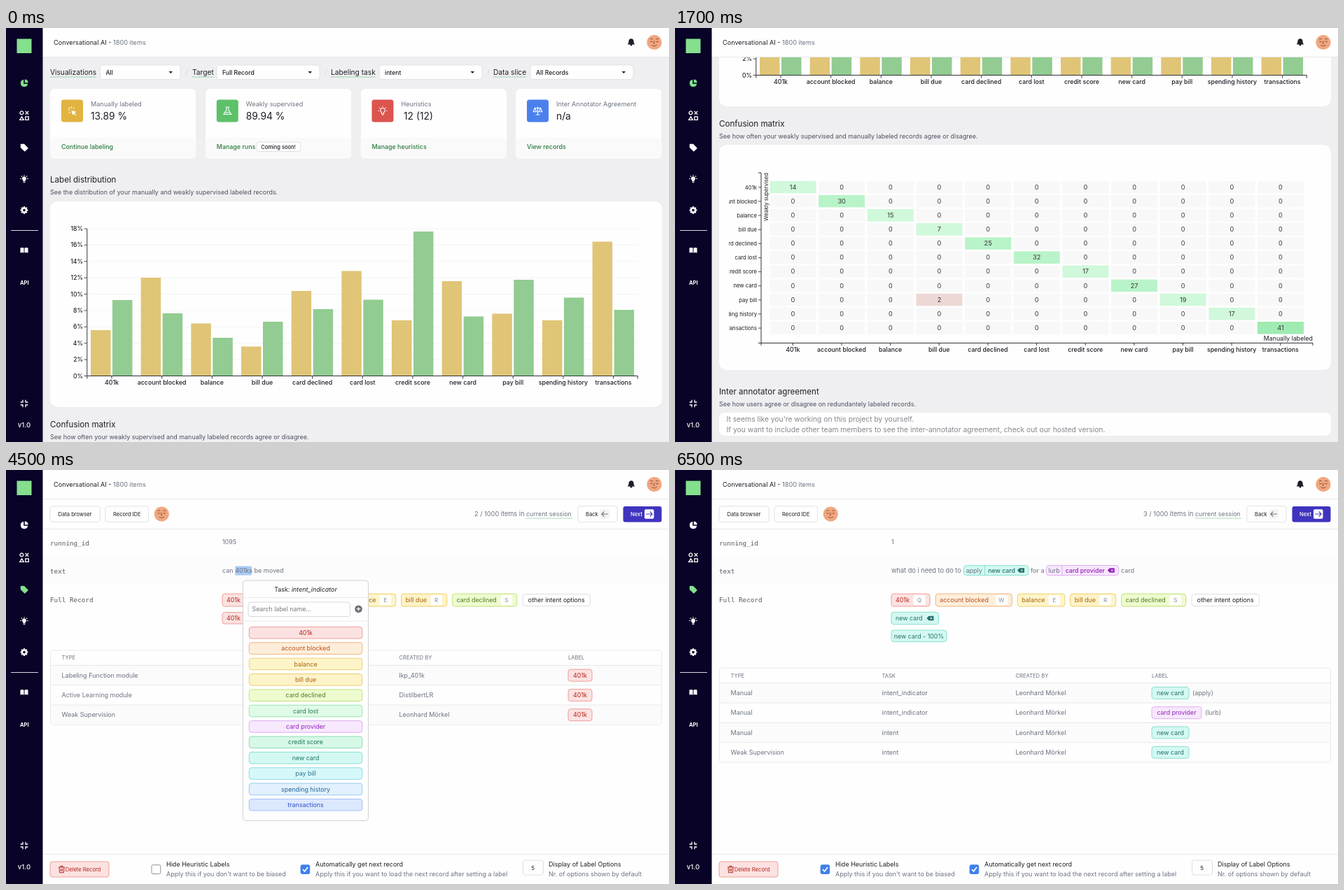
An HTML page that plays this animation: 947 px wide and 592 px high, repeating every 8 s.

```html
<!DOCTYPE html>
<html lang="en">
<head>
<meta charset="utf-8">
<title>Labeling tool tour</title>
<style>
html, body { margin: 0; width: 100%; height: 100%; overflow: hidden; background: #fefefe; }
svg { display: block; width: 100vw; height: 100vh; font-family: Inter, sans-serif; white-space: pre; }
.mono { font-family: "DejaVu Sans Mono", monospace; }
.card { filter: drop-shadow(0 .7px .7px #0002); }
.m { font-weight: 500; }
</style>
</head>
<body>
<svg id="stage" viewBox="0 0 947 592"></svg>
<script>
const INK = '#1d1f26', GRAY = '#6b7280', PALE = '#9b9da3', GREEN = '#2b7a3d', LINE = '#e3e4e7', LIME = '#85e08d';
const LABELS = ['401k', 'account blocked', 'balance', 'bill due', 'card declined', 'card lost',
  'credit score', 'new card', 'pay bill', 'spending history', 'transactions'];
const USER = 'Leonhard Mörkel', BRAND = 'lurb';
// background, border, text
const TINT = {
  red: ['#fbe2e1', '#ec8a86', '#b3241f'], orange: ['#fdeedb', '#f0a45e', '#b9501c'],
  amber: ['#fdf4c9', '#edc652', '#a8620f'], yellow: ['#fdf3c8', '#eac54a', '#a8620f'],
  lime: ['#eefbcf', '#b2dc5c', '#4d7c1f'], green: ['#dffbe7', '#85dda0', '#2c7d47'],
  purple: ['#f7e8fd', '#d79bee', '#9423b8'], emerald: ['#d7f8e6', '#74d3a7', '#20755a'],
  teal: ['#d3f9f2', '#72d8ca', '#26706b'], cyan: ['#d6f8fa', '#74d3e2', '#2a6f8c'],
  sky: ['#e2f1fd', '#7fbfed', '#1f659b'], blue: ['#dce8fd', '#8db3f3', '#2f4fc4']
};
const range = (n, fn) => Array.from({length: n}, (_, i) => fn(i)).join('');

// y is the vertical middle of the lettering
const text = (x, y, s, size = 8.9, fill = INK, attrs = '') =>
  `<text x="${x}" y="${y + size * .36}" font-size="${size}" fill="${fill}" ${attrs}>${s}</text>`;
const mid = (x, y, s, size, fill, attrs = '') => text(x, y, s, size, fill, 'text-anchor="middle" ' + attrs);
const end = (x, y, s, size, fill, attrs = '') => text(x, y, s, size, fill, 'text-anchor="end" ' + attrs);
const mono = (x, y, s, fill = INK) => text(x, y, s, 9.3, fill, 'class="mono"');
const rect = (x, y, w, h, fill, stroke = 'none', r = 0, attrs = '') =>
  `<rect x="${x}" y="${y}" width="${w}" height="${h}" fill="${fill}" stroke="${stroke}" stroke-width=".8" rx="${r}" ${attrs}/>`;
const card = (x, y, w, h, r, stroke) => rect(x, y, w, h, '#fefefe', stroke, r, 'class="card"');
const path = (d, stroke = INK, w = 1, fill = 'none', attrs = '') =>
  `<path d="${d}" stroke="${stroke}" stroke-width="${w}" fill="${fill}" ${attrs}/>`;
const disc = (x, y, r, fill, stroke = 'none', w = 1) =>
  `<circle cx="${x}" cy="${y}" r="${r}" fill="${fill}" stroke="${stroke}" stroke-width="${w}"/>`;
const group = (s, attrs) => `<g ${attrs}>${s}</g>`;
const at = (x, y, s) => group(s, `transform="translate(${x} ${y})"`);
const hline = (x1, x2, y, stroke = LINE, w = .8) => path(`M${x1} ${y}H${x2}`, stroke, w);
const dotted = (x1, x2, y) => path(`M${x1} ${y}H${x2}`, '#4fae68', .8, 'none', 'stroke-dasharray="1 .7"');
const button = (x, y, w, h, stroke = LINE) => card(x, y, w, h, 3, stroke);
const pill = (x, y, w, tint, s, h = 17) => rect(x, y - h / 2, w, h, TINT[tint][0], TINT[tint][1], 3.5) +
  mid(x + w / 2, y, s, 8.9, TINT[tint][2]);
const trash = (x, y, c) => at(x, y, path('M-4.5 -3H4.5M-1.5 -3V-4.7H1.5V-3M-3.5 -3L-3 4.7H3L3.5 -3M-1 -1V3M1 -1V3', c, 1));
const arrow = (x, y, c, dir = 1) => at(x, y, path(`M${-4.5 * dir} 0H${4.5 * dir}M${dir} -3.5L${4.5 * dir} 0L${dir} 3.5`, c, 1.1));
const erase = (x, y, c) => at(x, y, path('M-5 0L-2 -3.2H5V3.2H-2Z', 'none', 0, c) + path('M0 -1.4L2.8 1.4M2.8 -1.4L0 1.4', '#fff', .8));
const avatar = (x, y) => at(x, y, disc(0, 0, 10.6, '#f0a77f') +
  path('M-6 -4.5Q-4 -6 -2 -4.5M2 -4.5Q4 -6 6 -4.5M-6 -1.5Q-4 .2 -2 -1.5M2 -1.5Q4 .2 6 -1.5M0 -2L-.8 1.6H.8M-3.6 4Q0 7 3.6 4', '#8a4a35', .9));

/* Sidebar and header */
const ICONS = [
  at(26, 79, path('M-.8 -5.2A5.2 5.2 0 1 0 5.2 .8H-.8Z', 'none', 0, 'currentColor') +
    path('M.8 -5.6A5 5 0 0 1 5.6 -.8H.8Z', 'none', 0, 'currentColor')),
  at(26, 125, path('M-3.5 1.8L-6.3 6.3H-.7ZM1.8 1.8H6.3V6.3H1.8ZM1.6 -6L6.2 -1.4M6.2 -6L1.6 -1.4', 'currentColor', 1.3) +
    disc(-3.6, -3.7, 2.4, 'none', 'currentColor', 1.3)),
  at(26, 171, path('M-5.2 -4.4Q-5.2 -5.2 -4.4 -5.2H0L5.3 .2Q5.8 .8 5.3 1.4L1.4 5.2Q.8 5.7 .2 5.2L-5.2 0Z', 'none', 0, 'currentColor')),
  at(26, 216, path('M-1.6 3.4V1.8A3 3 0 1 1 1.6 1.8V3.4ZM-1.4 4.2H1.4V5.2H-1.4Z', 'none', 0, 'currentColor') +
    path('M0 -6V-4.4M-5.8 -.5H-4M4 -.5H5.8M-4.2 -4.5L-3 -3.4M4.2 -4.5L3 -3.4', 'currentColor', 1.1)),
  at(26, 260.5, disc(0, 0, 3, 'none', 'currentColor', 2.4) +
    range(8, i => path('M0 -5.4V-3.6', 'currentColor', 2.2, 'none', `transform="rotate(${i * 45})"`))),
  at(26, 318, path('M-5.5 -3.6Q-2.5 -4.6 -.5 -3.4V3.6Q-2.5 2.6 -5.5 3.5ZM5.5 -3.6Q2.5 -4.6 .5 -3.4V3.6Q2.5 2.6 5.5 3.5Z', 'none', 0, 'currentColor')),
  mid(26.3, 364, 'API', 7.6, 'currentColor', 'font-weight="700"'),
  at(26, 537, path('M-5.3 -2H-2V-5.3M5.3 -2H2V-5.3M-5.3 2H-2V5.3M5.3 2H2V5.3', 'currentColor', 1.3)),
  mid(26, 568, 'v1.0', 9.6, 'currentColor', 'class="m"')
];
const frame = rect(52, 0, 895, 41.5, '#fefefe') + hline(52, 947, 41.6, '#e4e4e7') +
  rect(0, 0, 52.5, 592, '#080327') + rect(15.5, 15.5, 21, 20.5, LIME) +
  ICONS.map(s => group(s, 'class="icon"')).join('') + hline(7, 46, 289.5, '#d8d8df', 1.2) +
  text(68, 20.5, `Conversational AI - <tspan fill="${GRAY}">1800 items</tspan>`, 9.15) +
  at(893, 20, path('M-4.7 3.2Q-3.3 1.8 -3.3 -1A3.3 3.6 0 0 1 3.3 -1Q3.3 1.8 4.7 3.2Z', INK, .5, INK) + disc(0, 4, 1.5, INK)) +
  avatar(926, 20.5);

/* Dashboard */
const select = (x, w, s) => rect(x, 53, w, 20.5, '#fefefe', '#dcdde1', 3.5) + text(x + 8, 63.5, s, 8.6, INK, 'class="m"') +
  path(`M${x + w - 16.5} 62H${x + w - 11}L${x + w - 13.7} 65Z`, 'none', 0, INK);
const filterName = (x, w, s) => text(x, 63, s, 10.2) + dotted(x, x + w, 70);
const stat = (x, color, icon, name, value, link) => card(x, 87, 208.5, 100, 6) +
  rect(x, 157, 208.5, 30, '#fafafa', 'none', 6) +
  rect(x + 16, 102.5, 31, 32, color, 'none', 3.5) + at(x + 31.5, 118.5, icon) +
  text(x + 58, 109, name, 9.1, GRAY) + text(x + 58, 126.5, value, 13.8) + text(x + 16, 169.5, link, 8.9, GREEN, 'class="m"');
const heading = (y, title, sub) => text(63, y, title, 11.6) + text(63, y + 18, sub, 8.95, '#4b5060');

const YELLOW = [432, 357, 422.5, 455.5, 376, 347.5, 418, 362, 408.5, 418, 305.5];
const LEAF = [389, 408, 443, 420, 402, 388.5, 291, 412.5, 360, 385.5, 403];
const bar = (x, top, c) => rect(x, top, 28.5, 497.5 - top, c);
const barChart = card(63, 247.5, 874, 294.5, 10) +
  range(10, i => {
    const y = 497.5 - i * 23.39;
    return hline(116, 902, y, '#f1f1f3') + hline(111.5, 115.5, y, INK) + end(110, y, i * 2 + '%', 8.6, INK, 'class="m"');
  }) +
  LABELS.map((s, i) => {
    const x = 121 + i * 71.66;
    return bar(x, YELLOW[i], '#e0c577') + bar(x + 31, LEAF[i], '#92cc92') +
      path(`M${x + 30} 497.5V501.5`, INK, .9) + mid(x + 30, 506.7, s, 8.8, INK, 'class="m"');
  }).join('') + path('M115.8 287V497.5H902.3V501.5M115.8 497.5V501.5', INK, .9);

const DIAGONAL = [14, 30, 15, 7, 25, 32, 17, 27, 19, 17, 41];
const shade = v => ['#d0f8da', '#b9f3c8', '#9febb2'][Math.floor(v / 20)];
const cell = (row, col) => {
  const odd = row === 8 && col === 3, v = odd ? 2 : row === col ? DIAGONAL[row] : 0;
  const x = 135.5 + col * 69.65, y = 648.7 + row * 20.13;
  return rect(x, y, 66, 17.6, odd ? '#edd8d6' : v ? shade(v) : '#f8f8f9') + mid(x + 33, y + 8.6, v, 9.2, '#34363c');
};
const matrix = card(63, 597, 874, 322, 10) + '<clipPath id="inner"><rect x="77" y="630" width="850" height="280"/></clipPath>' +
  group(LABELS.map((s, i) => {
    const y = 657.5 + i * 20.13, x = 168.3 + i * 69.65;
    return end(117, y + .3, s, 7.7) + hline(119, 123, y + .3, INK) + range(11, c => cell(i, c)) +
      path(`M${x} 880.5V884`, INK, .9) + mid(x, 889.5, s, 8.8, INK, 'class="m"');
  }).join(''), 'clip-path="url(#inner)"') +
  path('M119 637H123V884M119 880.5H911V884', INK, .9) +
  text(0, 0, 'Weakly supervised', 7.7, INK, 'text-anchor="end" transform="translate(130 637) rotate(-90)"') +
  end(911, 873.5, 'Manually labeled', 8.8);

const dashboard = rect(52, 0, 895, 1100, '#efeff1') +
  filterName(63, 66, 'Visualizations') + select(134.5, 114.5, 'All') +
  filterName(266, 30, 'Target') + select(301, 147, 'Full Record') +
  filterName(464, 63.5, 'Labeling task') + select(533, 147, 'intent') +
  filterName(696, 47.5, 'Data slice') + select(749, 147, 'All Records') +
  [258, 457, 689].map(x => mid(x, 63, '/', 10, '#d5d6da')).join('') +
  stat(63, '#e1b341', path('M-1 -1L6 1.5L3.2 3L6 6L4.8 6.8L2 4L.5 6.3Z', 'none', 0, '#fff') +
    path('M-6 -1.5H-3.5M-1 -6V-4M-5 -5L-3 -3.3M3 -5L1.5 -3.3M-4.5 3L-3 1.4', '#fff', 1.1), 'Manually labeled', '13.89 %', 'Continue labeling') +
  stat(284.8, '#5cc169', path('M-2.5 -5.5H2.5M-1.5 -5.5V-1L-5.5 5H5.5L1.5 -1V-5.5M-3.8 2.5H3.8', '#fff', 1.1), 'Weakly supervised', '89.94 %', 'Manage runs') +
  stat(506.5, '#dc544e', path('M-1.5 4V2.2A3.3 3.3 0 1 1 1.5 2.2V4ZM-1.5 5.7H1.5M0 -6.8V-5.4M-6.5 0H-5M5 0H6.5M-4.8 -4.8L-3.8 -3.8M4.8 -4.8L3.8 -3.8', '#fff', 1.1), 'Heuristics', '<tspan dx="3.5">12 (12)</tspan>', 'Manage heuristics') +
  stat(728, '#4b80ec', path('M0 -6V5.5M-3 5.5H3M-5 -4H5M-4 -4L-6.3 1.2H-1.7ZM4 -4L1.7 1.2H6.3Z', '#fff', 1.1), 'Inter Annotator Agreement', 'n/a', 'View records') +
  rect(358, 163, 63, 13.5, '#fefefe', '#d9dade', 3.5) + mid(389, 169.8, 'Coming soon!', 7.5, INK, 'class="m"') +
  heading(217, 'Label distribution', 'See the distribution of your manually and weakly supervised labeled records.') + barChart +
  heading(567, 'Confusion matrix', 'See how often your weakly supervised and manually labeled records agree or disagree.') + matrix +
  heading(949.8, 'Inter annotator agreement', 'See how users agree or disagree on redundantely labeled records.') +
  card(63, 979.5, 874, 33.5, 8) + text(73.5, 988.8, "It seems like you're working on this project by yourself.", 10.3, '#85878d') +
  text(73.5, 1004.5, 'If you want to include other team members to see the inter-annotator agreement, check out our hosted version.', 10.3, '#85878d');

/* Data browser */
const section = (y, title, sub, extra = '') => path(`M65.5 ${y + 3.5}L69.5 ${y + 7.5}L73.5 ${y + 3.5}`, INK, 1.1) +
  text(81.5, y, title, 9.8) + text(154, y, extra, 9.8) + text(81.5, y + 13, sub, 7.6, PALE);
const record = (y, h, id, s, foot) => card(321.3, y, 615.3, h, 4, LINE) + mono(337, y + 22.7, 'running_id') + text(337, y + 35.6, id) +
  mono(337, y + 59.7, 'text') + text(337, y + 72.6, s) +
  text(337, foot, 'Find similar records', 8.9, GREEN, 'class="m"') + at(431, foot, path('M-6 5L0 -5L6 5ZM1.5 -5L6 3', GREEN, 1)) +
  end(902, foot, 'Continue with this record', 8.9, GREEN, 'class="m"') + arrow(912, foot + .5, GREEN);
const COLS = [424, 548, 623.5, 708, 837], WIDE = [406.5, 539, 657, 750, 853.5];
const results = (y, h, cols, rows, tint, w) => rect(337.5, y, 582, h, '#fefefe', LINE, 3) +
  ['TYPE', 'TASK', 'LABEL', 'AMOUNT', 'AVG. CONFIDENCE'].map((s, i) => mid(cols[i], y + 10.8, s, 7.6, GRAY)).join('') +
  rows.map((r, i) => {
    const ry = y + 21.5 + i * 24.4;
    return hline(337.5, 919.5, ry) + r.map((s, c) => c === 2 ? pill(cols[c] - w / 2, ry + 12.4, w, tint, s) :
      mid(cols[c], ry + 12.4, s, 8.7, GRAY)).join('');
  }).join('');
const browser = rect(52, 41, 263.5, 551, '#fefefe') + rect(315.5, 41, 632, 551, '#f4f4f5') +
  text(63, 62, 'Existing filters', 11.2) + rect(149.3, 56.7, 10.6, 10.6, 'none', INK, 1.5) + path('M153 57V67', INK, 1.2) +
  ['You can filter and order all your data in the browser', 'according to your needs. Selected filter criteria can be', 'saved and used later on.']
    .map((s, i) => text(63, 77.5 + i * 13.2, s, 8.9, PALE)).join('') +
  button(63, 116, 111.5, 22) + disc(77, 127, 5.8, '#e4edfd', '#3564cf', 1.2) + path('M77 126.3V130M77 123.7V124.9', '#3564cf', 1.3) +
  text(88.5, 127, 'random_ord...', 8.9, '#42454d') + trash(161, 127, '#c2352d') +
  text(63, 160.5, 'Filter creation', 11.4) + hline(147, 305, 160.5) +
  section(188.3, 'Attributes', 'Filter on attributes of your records') +
  section(225.1, 'Users', 'Filter manual labels by creation user') +
  section(262, 'Labeling Task:', 'Choose from anything related to intent_indicator', 'intent_indicator') +
  section(298.8, 'Labeling Task:', 'Choose from anything related to intent', 'intent') +
  section(335.7, 'Result Order', 'Order your results by') +
  text(63, 373.8, 'Connect by', 10.3) + dotted(63, 119, 380.5) +
  disc(130, 373.7, 4.8, '#fff', '#3477ea', 1.1) + disc(130, 373.7, 2.7, '#3477ea') + text(138, 373.7, 'OR', 8) +
  disc(159.8, 373.7, 4.8, '#fff', '#777', .8) + text(168, 373.7, 'AND', 7.8) +
  button(63, 394, 84, 24) + text(91, 406, 'Save filter', 7.5) + at(78, 406, path('M-5 -4.6H5L1.3 .2V4.5L-1.3 3V.2Z', INK, 1.1)) +
  button(152, 394, 82, 24, '#eeeef0') + text(178, 406, 'Update filter', 7.5, PALE) +
  at(164.5, 406, path('M1 5A5 5 0 0 0 4 -3.5M-1.5 -5A5 5 0 0 0 -4 3.5M-4 3.5H-1M-4 3.5V.8M0 -5.3H3.8V-2', PALE, 1)) +
  button(63, 421.5, 84, 24) + text(91, 433.5, 'Find outliers', 7.5) +
  disc(74.6, 436, 2.8, 'none', '#76802b', 1.3) + disc(80.5, 430, 2.5, 'none', '#76802b', 1.3) + disc(81, 437.5, 1.7, 'none', '#76802b', 1.1) + disc(74.5, 429.5, 1.2, '#76802b') +
  text(321, 65, '1,800 Items', 8.8) +
  button(717, 53, 84.5, 24) + text(744.5, 65, 'Configuration', 7.6) +
  at(732, 65, path('M-4 -5.5V5.5M0 -5.5V5.5M4 -5.5V5.5', INK, 1.1) + disc(-4, 1.5, 1.4, '#fff', INK, 1) + disc(0, -2, 1.4, '#fff', INK, 1) + disc(4, 2.5, 1.4, '#fff', INK, 1)) +
  button(804.5, 53, 126.5, 24) + text(829.5, 65, 'Download filtered records', 7.6) +
  at(819, 65, path('M-5.3 2V5.2H5.3V2M0 -5.5V2M-3 -1L0 2L3 -1', INK, 1.1)) +
  record(99, 117.8, '668', 'what is my fica score', 197.5) +
  record(228, 221, '1095', 'can 401ks be moved', 429.6) +
  results(318, 94.7, COLS, [['AL: DistilbertLR', 'intent', '401k', '1', ''], ['LF: lkp_401k', 'intent', '401k', '1', ''],
    ['Weak Supervision', 'intent', '401k', '1', '99.99%']], 'red', 33.5) +
  record(460.3, 200, '1', `what do i need to do to apply for a ${BRAND} card`, 640) +
  results(550.3, 90, WIDE, [['AL: DistilbertLR', 'intent', 'new card', '1', '']], 'teal', 53.5) +
  rect(315.5, 584.5, 632, 8, '#f4f4f5');

/* Labeling view */
const choice = (x, w, tint, s, key) => rect(x, 177, w, 18, TINT[tint][0], TINT[tint][1], 3.5) + text(x + 6, 186, s, 8.9, TINT[tint][2]) +
  rect(x + w - 23.5, 179, 17, 14, '#fefefe', 'none', 2.5) + mid(x + w - 15, 186, key, 8, '#85878d');
const option = (x, y, title, sub) => text(x, y, title, 9) + text(x, y + 13.2, sub, 9, GRAY);
const check = (x, on) => rect(x, 564.7, 12.8, 12.8, on ? '#3f7fec' : '#fff', on ? '#3f7fec' : '#777', 2) +
  (on ? path(`M${x + 3} 571.2L${x + 5.6} 574L${x + 10} 568`, '#fff', 1.7) : '');
const labeling = (pos, id, body, hide) => rect(52, 41, 895, 551, '#fefefe') + hline(52, 947, 84.5) +
  button(63, 52, 71, 22) + mid(98.5, 63, 'Data browser', 7.6) + button(142, 52, 61.5, 22) + mid(172.8, 63, 'Record IDE', 7.6) + avatar(222.3, 63) +
  text(669, 63, pos + ' / 1000 items in', 9.2, GRAY) + text(743, 63, 'current session', 8.9, GRAY) + dotted(743, 809, 69) +
  button(817, 51.5, 56, 23) + text(828, 63, 'Back', 7.6) + rect(848.5, 56.3, 13.5, 13.5, '#f3f3f5', 'none', 2) + arrow(855.3, 63, '#777', -1) +
  rect(881.5, 52, 55, 22.5, '#3f34bd', 'none', 3) + text(892, 63, 'Next', 7.6, '#fff', 'class="m"') +
  rect(912, 56.3, 13.5, 13.5, '#fff', 'none', 2) + arrow(918.7, 63, '#4b41bd') +
  rect(52, 125, 895, 39, '#fcfcfc') +
  mono(63, 105, 'running_id', '#555862') + mono(63, 145, 'text', '#555862') + mono(63, 185.5, 'Full Record', '#555862') +
  text(309, 103, id, 8.9, GRAY) +
  choice(309, 55, 'red', '401k', 'Q') + choice(372.3, 109, 'orange', 'account blocked', 'W') + choice(489.3, 67.5, 'amber', 'balance', 'E') +
  choice(564.7, 65, 'yellow', 'bill due', 'R') + choice(637.7, 92, 'lime', 'card declined', 'S') +
  rect(738, 177.5, 96.5, 17, '#fefefe', '#d6d7db', 3.5) + mid(786.3, 186, 'other intent options', 8.8) + body +
  rect(52, 549.5, 895, 43, '#fefefe') + hline(52, 947, 549.5) +
  rect(63, 560, 84, 22, TINT.red[0], TINT.red[1], 3) + trash(79.5, 571, TINT.red[2]) + text(84.7, 571, 'Delete Record', 7.6, TINT.red[2]) +
  check(208, hide) + option(229, 564.2, 'Hide Heuristic Labels', "Apply this if you don't want to be biased") +
  check(421, true) + option(442, 564.2, 'Automatically get next record', 'Apply this if you want to load the next record after setting a label') +
  rect(738.5, 558, 29, 21, '#fefefe', '#d6d7db', 3) + mid(752.5, 568.7, '5', 8) +
  option(775, 564.2, 'Display of Label Options', 'Nr. of options shown by default');
// Each row: texts per column, tint, pill width, optional note
const history = (y, cols, rows) => rect(63.5, y, 873, 21.7 + rows.length * 28.3, '#fefefe', LINE, 3) +
  ['TYPE', 'TASK', 'CREATED BY', 'LABEL'].map((s, i) => text(cols[i], y + 10.8, s, 7.6, GRAY)).join('') +
  rows.map(([cells, tint, w, note = ''], r) => {
    const top = y + 21.7 + r * 28.3, cy = top + 14.2;
    return (r % 2 ? '' : rect(64, top, 872, 28, '#fbfbfb')) + hline(63.5, 936.5, top) +
      cells.map((s, i) => i < 3 ? text(cols[i], cy, s, 9, GRAY) : pill(cols[i], cy, w, tint, s)).join('') +
      text(cols[3] + w + 5, cy, note, 9, GRAY);
  }).join('');

const MENU = [...LABELS];
MENU.splice(6, 0, 'card provider');
const popup = rect(338.5, 158, 179, 343.5, '#fefefe', '#cbccd1', 4, 'class="card"') +
  mid(428, 170.5, 'Task: <tspan font-style="italic">intent_indicator</tspan>', 8.9) + hline(338.5, 517.5, 182.5) +
  rect(346, 189, 145.5, 20.5, '#fefefe', '#d0d1d6', 3) + text(351.5, 199, 'Search label name...', 8.8, '#777a82') +
  disc(503.5, 198.7, 5.3, '#6b6e76') + path('M500.8 198.7H506.2M503.5 196V201.4', '#fff', 1.2) + hline(338.5, 517.5, 216) +
  MENU.map((s, i) => pill(347.3, 232.7 + i * 22.37, 161.5, Object.keys(TINT)[i], s, 16.6)).join('');
const popupView = labeling(2, '1095',
  rect(327.3, 137.5, 23.5, 13, '#a9c9f5') + text(309, 144, 'can 401ks be moved', 9, GRAY) +
  rect(309, 203.5, 76, 16.5, TINT.red[0], TINT.red[1], 3.5) + text(315, 212, '401k - 100%', 8.9, TINT.red[2]) +
  history(257.7, [79.5, 360, 561.5, 803], [
    [['Labeling Function module', 'intent', 'lkp_401k', '401k'], 'red', 34],
    [['Active Learning module', 'intent', 'DistilbertLR', '401k'], 'red', 34],
    [['Weak Supervision', 'intent', USER, '401k'], 'red', 34]]) + popup, false);

const span = (x, w, cut, tint, word, label) => rect(x, 136.5, w, 14, TINT[tint][0], TINT[tint][1], 4) +
  path(`M${cut} 136.5V150.5`, TINT[tint][1], .8) + text(x + 3, 143.5, word, 9, GRAY) +
  text(cut + 4.7, 143.5, label, 8.8, TINT[tint][2], 'class="m"') + erase(x + w - 11, 143.5, TINT[tint][2]);
const taggedView = labeling(3, '1',
  text(309, 144, 'what do i need to do to', 9.2, GRAY) + span(412.5, 92.5, 442.5, 'teal', 'apply', 'new card') +
  text(508, 144, 'for a', 9, GRAY) + span(530.3, 103.5, 553, 'purple', BRAND, 'card provider') + text(637, 144, 'card', 9, GRAY) +
  rect(309, 203.3, 67.5, 17.5, TINT.teal[0], TINT.teal[1], 3.5) + text(315, 212, 'new card', 8.9, TINT.teal[2]) + erase(364.5, 212, TINT.teal[2]) +
  pill(309, 237.3, 79, 'teal', 'new card - 100%', 16.5) +
  history(283, [79.5, 295.5, 486.5, 681], [
    [['Manual', 'intent_indicator', USER, 'new card'], 'teal', 53, '(apply)'],
    [['Manual', 'intent_indicator', USER, 'card provider'], 'purple', 71, `(${BRAND})`],
    [['Manual', 'intent', USER, 'new card'], 'teal', 53],
    [['Weak Supervision', 'intent', USER, 'new card'], 'teal', 53]]), true);

/* Playback: start time, view, scroll, active icon */
const STEPS = [[0, 0, 0, 0], [500, 0, 430, 0], [2500, 1, 0, 1], [4500, 2, 0, 2], [6500, 3, 0, 2]];
const stage = document.getElementById('stage');
stage.innerHTML = [dashboard, browser, popupView, taggedView].map(s => group(s, 'class="view"')).join('') + frame;
const views = stage.querySelectorAll('.view'), icons = stage.querySelectorAll('.icon');
function draw(ms) {
  const [, view, scroll, active] = STEPS.findLast(s => s[0] <= ms);
  views.forEach((v, i) => v.setAttribute('display', i === view ? 'inline' : 'none'));
  views[0].setAttribute('transform', `translate(0 ${-scroll})`);
  icons.forEach((g, i) => g.style.color = i === active ? LIME : '#fff');
}
let start;
function tick(now) {
  start ??= now;
  draw((now - start) % 8000);
  requestAnimationFrame(tick);
}
draw(0);
requestAnimationFrame(tick);
</script>
</body>
</html>
```
